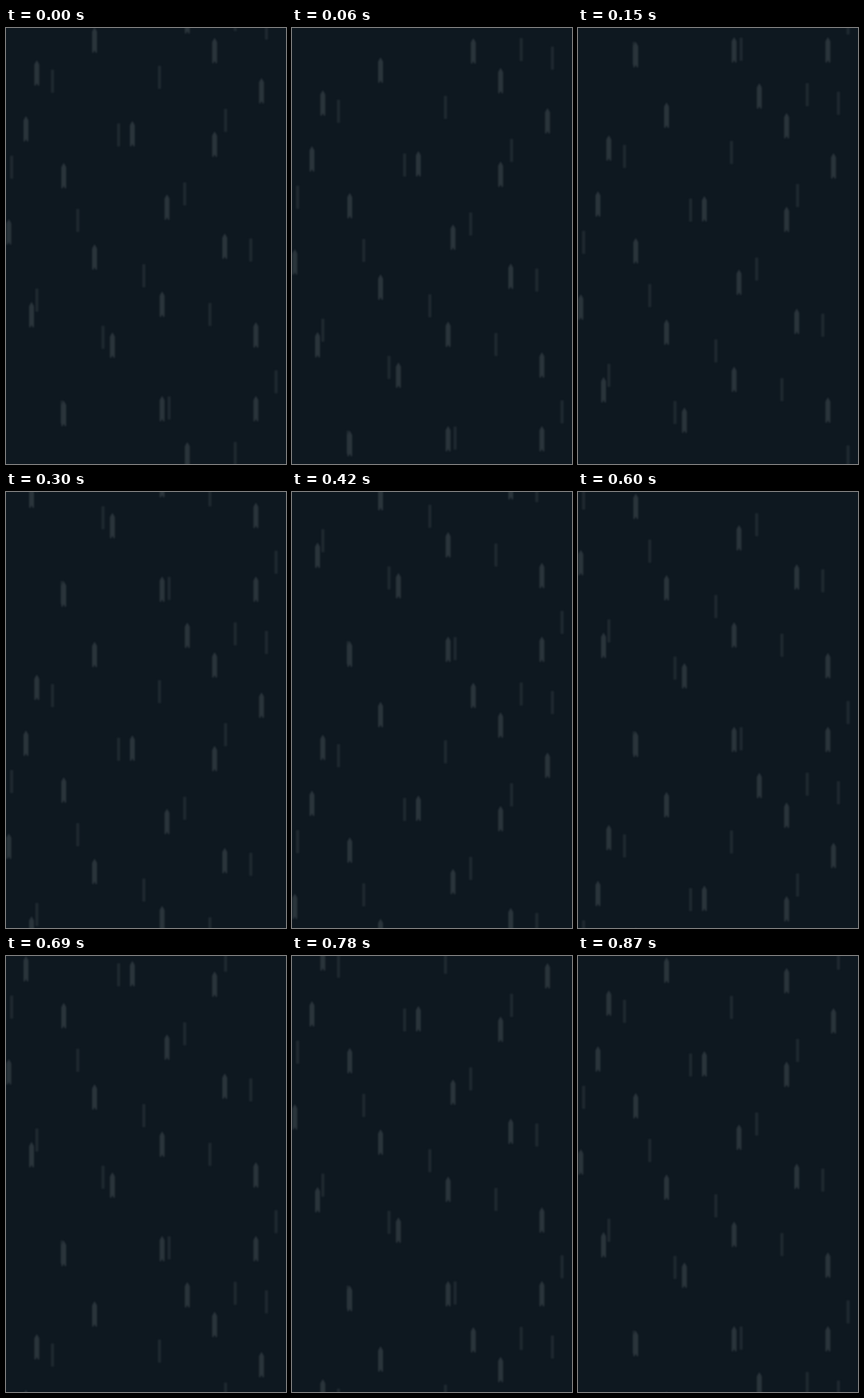
An HTML page for the animation above (0.9 s loop, 400 px wide and 624 px high).

```html
<!DOCTYPE html>
<html lang="en">
<head>
<meta charset="utf-8">
<title>Rain</title>
<style>
  html, body { margin: 0; width: 100%; height: 100%; overflow: hidden; background: #0e1820; }
  svg { display: block; width: 100vw; height: 100vh; }
</style>
</head>
<body>
<svg viewBox="0 0 400 624" preserveAspectRatio="none">
  <defs>
    <filter id="soft" x="-100%" y="-20%" width="300%" height="140%" color-interpolation-filters="sRGB">
      <feGaussianBlur stdDeviation="1.1"/>
    </filter>
    <path id="near" filter="url(#soft)" fill="#2a343b"
      d="M0 -19 L3.5 -13 V17 L2 18 L0 14 L-2 18 L-3.5 17 V-13 Z"/>
    <rect id="far" filter="url(#soft)" fill="#1f2930" x="-2.2" y="-16.5" width="4.4" height="33"/>
    <g id="sheet"></g>
  </defs>
  <rect width="400" height="624" fill="#0e1820"/>
  <g id="rain">
    <use href="#sheet"/>
    <use href="#sheet" y="-621"/>
  </g>
</svg>
<script>
const WIDTH = 400, FALL = 624, SHEET = 621;
const LOOP = 900, STEP = 30, LAST = LOOP / STEP - 1;
const FAR_COUNT = 17, GOLDEN = 0.618034;

// Centres of the bright drops, top to bottom
const nearDrops = [
  [126.5, 18], [298, 33], [44, 65], [365, 90.5], [28.5, 145],
  [180.5, 152], [298, 167], [82.5, 212], [230, 257], [4, 292.5],
  [312.5, 313], [126.5, 328.5], [223, 396], [36.5, 411], [357, 440],
  [152, 454.5], [223, 545.5], [357, 545.5], [82.5, 552.5], [259, 611.5]
];

const sheet = document.getElementById("sheet");
const rain = document.getElementById("rain");

function seeded(seed) {
  return () => (seed = (seed * 16807) % 2147483647) / 2147483647;
}

function addDrop(kind, x, y) {
  const drop = document.createElementNS("http://www.w3.org/2000/svg", "use");
  drop.setAttribute("href", "#" + kind);
  drop.setAttribute("x", x);
  drop.setAttribute("y", y);
  sheet.append(drop);
}

// Faint drops: even spread across, jittered rows down
function addFarDrops() {
  const random = seeded(372);
  for (let i = 0; i < FAR_COUNT; i++) {
    const x = (0.93 + i * GOLDEN) % 1 * WIDTH;
    const y = (i + random()) / FAR_COUNT * SHEET;
    addDrop("far", x, y);
  }
}

function draw(time) {
  const step = Math.floor((time % LOOP) / STEP);
  rain.setAttribute("transform", `translate(0 ${FALL * step / LAST})`);
}

function tick() {
  draw(performance.now() - start);
  requestAnimationFrame(tick);
}

addFarDrops();
for (const [x, y] of nearDrops) addDrop("near", x, y);
const start = performance.now();
tick();
</script>
</body>
</html>
```
